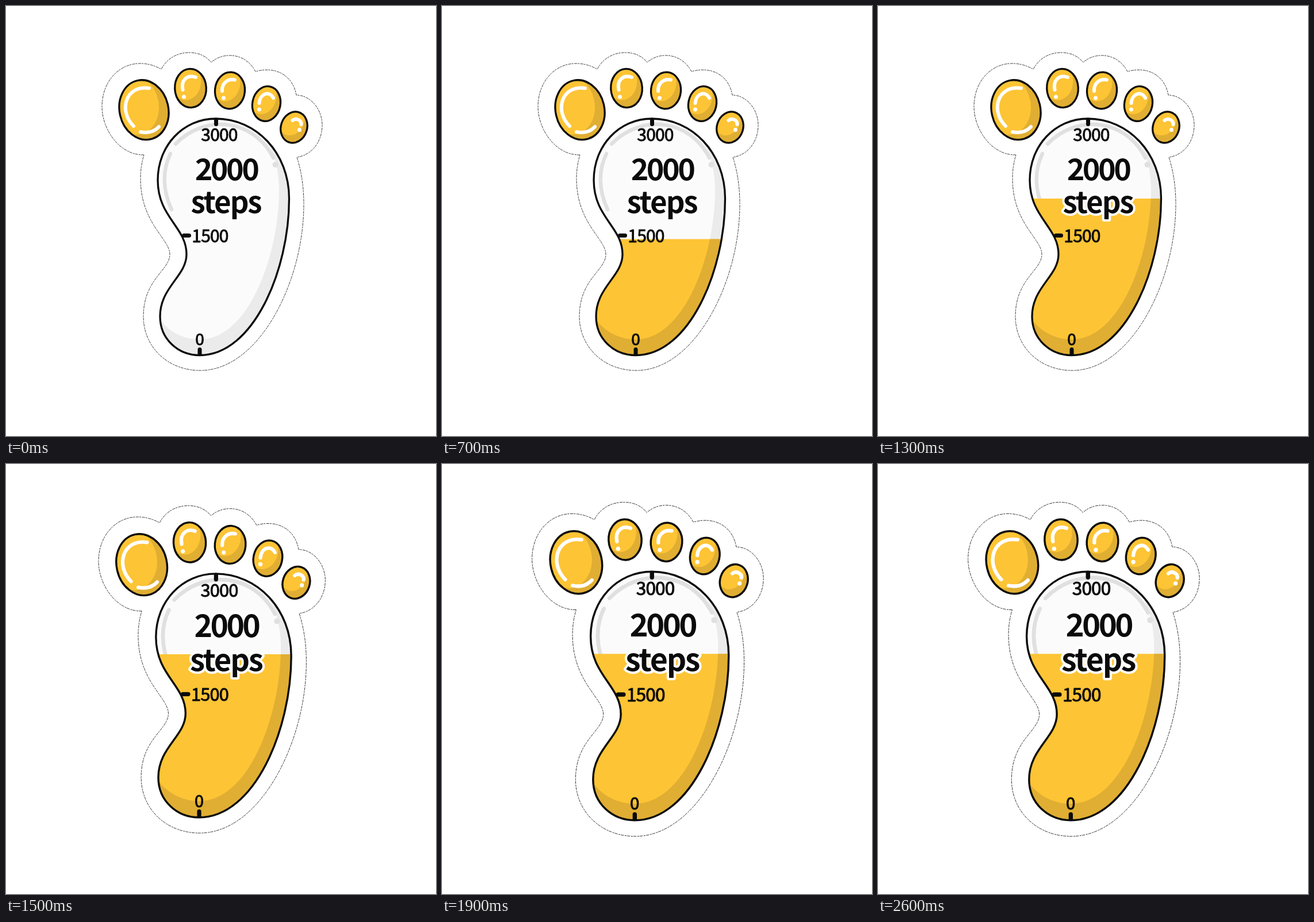
Recreate the animation shown at these times as an HTML page. Size 748x748 px, loop 2700 ms.

```html
<!DOCTYPE html>
<html lang="en">
<head>
<meta charset="utf-8">
<title>Step counter foot</title>
<style>
  html, body { margin: 0; width: 100%; height: 100%; overflow: hidden; background: #fff; }
  svg { display: block; width: 100vw; height: 100vh; }
  text { font-family: "Noto Sans CJK SC", "Noto Sans CJK JP", "Noto Sans", sans-serif; fill: #0b0b0b; text-anchor: middle; }
  .small { font-size: 30px; letter-spacing: -.8px; stroke: #0b0b0b; stroke-width: .9; stroke-linejoin: round; }
  .big { font-weight: 700; stroke: #fff; stroke-width: 8; stroke-linejoin: round; paint-order: stroke; }
  .ink { fill: none; stroke: #0b0b0b; stroke-width: 3.3; }
  .tick { stroke: #0b0b0b; stroke-width: 7; stroke-linecap: round; }
  .shine { fill: none; stroke-width: 6.5; stroke-linecap: round; }
</style>
</head>
<body>
<svg viewBox="0 0 748 748">
  <defs>
    <path id="sole" d="M365 196 C308 196 264 243 264 303 C264 368 314 384 314 432 C314 470 268 489 268 540 C268 580 300 607.5 337 607.5 C430 607.5 492.5 460 492.5 335 C492.5 255 435 196 365 196Z"/>
    <path id="shade" d="M430 206 C460 232 475 275 475 320 C475 433 422 580 337 580 C310 580 285 568 268 546 L250 620 H510 V206Z"/>
    <clipPath id="inSole"><use href="#sole"/></clipPath>
    <clipPath id="filled"><rect id="level" x="250" y="607" width="260" height="400"/></clipPath>
  </defs>
  <g id="foot">
    <path fill="none" stroke="#111" stroke-width=".8" stroke-dasharray="5 1 3 1.5" d="M240 259 C198 260 167 215 167 175 C167 132 196 100 233 100 Q253 100 270 110 C280 91 298 81 319 81 C335 81 348 87 357 98 C366 90 377 86 389 86 C409 86 425 97 434 114 C468 104 499 120 505 155 C530 155 550 180 550 207 C550 238 530 260 506 263 C514 288 518 315 518 345 C518 480 440 634 338 634 C280 634 239 592 239 540 C239 475 285 460 285 432 C285 405 234 378 234 300 Q234 279 240 259Z"/>
    <g id="toes"></g>
    <g clip-path="url(#inSole)">
      <use href="#sole" fill="#fbfbfb"/>
      <use href="#shade" fill="#ebebeb"/>
      <path class="shine" stroke="#e0e0e0" d="M286 257 C272 285 272 320 288 354 M295 240 C345 188 430 195 465 264"/>
      <circle cx="468.5" cy="276" r="5" fill="#e0e0e0"/>
      <g clip-path="url(#filled)">
        <use href="#sole" fill="#fdc435"/>
        <use href="#shade" fill="#e0ae32"/>
      </g>
    </g>
    <use href="#sole" class="ink"/>
    <path class="tick" d="M365.5 198 V205.5 M337 597.5 V605 M309.5 399.3 H318.5"/>
    <text class="small" x="371" y="235">3000</text>
    <text class="small" x="355" y="411">1500</text>
    <text class="small" x="336.5" y="590" style="font-size:28px">0</text>
    <text class="big" x="383" y="303" font-size="52" letter-spacing="-3.5">2000</text>
    <text class="big" x="382.5" y="360" font-size="51" letter-spacing="-2">steps</text>
  </g>
</svg>
<script>
const find = id => document.getElementById(id);

// Each toe: centre, radii, tilt, offset of the lit area, shine path, shine dot
const toes = [
  { x: 240, y: 180.7, rx: 42.5, ry: 52.3, tilt: -13, dx: -17, dy: -9, shine: 'M249 143 C208 137 195 182 222 209 M234 219 Q254 223 266 210' },
  { x: 321, y: 143, rx: 27.3, ry: 33.7, tilt: -3, dx: -9, dy: -13, shine: 'M307.5 146 C304 128 316 119 330 124', dot: [309.5, 158] },
  { x: 389.5, y: 147, rx: 26, ry: 32, tilt: 5, dx: -8, dy: -13, shine: 'M376 148 C375 135 385 126 398 128.5', dot: [378.5, 160] },
  { x: 453, y: 170, rx: 24.3, ry: 30.5, tilt: 12, dx: -7, dy: -12, shine: 'M440.5 169 C442 152 458 147 465 160', dot: [440.5, 180] },
  { x: 501, y: 211, rx: 22.8, ry: 27.5, tilt: 18, dx: -5, dy: -13, shine: 'M498.5 199 C504 194 514 198 513.5 206', dot: [510.5, 215.5] }
];

find('toes').innerHTML = toes.map((toe, i) => {
  const ellipse = (attrs, dx = 0, dy = 0) =>
    `<ellipse rx="${toe.rx}" ry="${toe.ry}" transform="translate(${toe.x + dx} ${toe.y + dy}) rotate(${toe.tilt})" ${attrs}/>`;
  const dot = toe.dot ? `<circle cx="${toe.dot[0]}" cy="${toe.dot[1]}" r="3.5" fill="#fff"/>` : '';
  return `<clipPath id="toe${i}">${ellipse('')}</clipPath>
    ${ellipse('fill="#e0ae32"')}
    <g clip-path="url(#toe${i})">${ellipse('fill="#fdc435"', toe.dx, toe.dy)}</g>
    <path class="shine" stroke="#fff" style="stroke-width:6" d="${toe.shine}"/>${dot}
    ${ellipse('class="ink"')}`;
}).join('');

const LOOP = 2700, STEP = 100;
const EMPTY = 607, FULL = 332, FILL_TIME = 1450;

// Swells after filling, overshoots, then settles
function growth(t) {
  if (t <= 1400) return 0;
  if (t <= 1600) return 0.071 * ((t - 1400) / 200) ** 1.25;
  return t < 1700 ? 0.071 - 0.02 * (t - 1600) / 100 : 0.051;
}

function draw() {
  const t = Math.floor(performance.now() % LOOP / STEP) * STEP;
  const left = 1 - Math.min(1, t / FILL_TIME);
  find('level').setAttribute('y', FULL + (EMPTY - FULL) * left * left);
  find('foot').setAttribute('transform', `translate(370 366) scale(${1 + growth(t)}) translate(-370 -366)`);
  requestAnimationFrame(draw);
}
draw();
</script>
</body>
</html>
```
